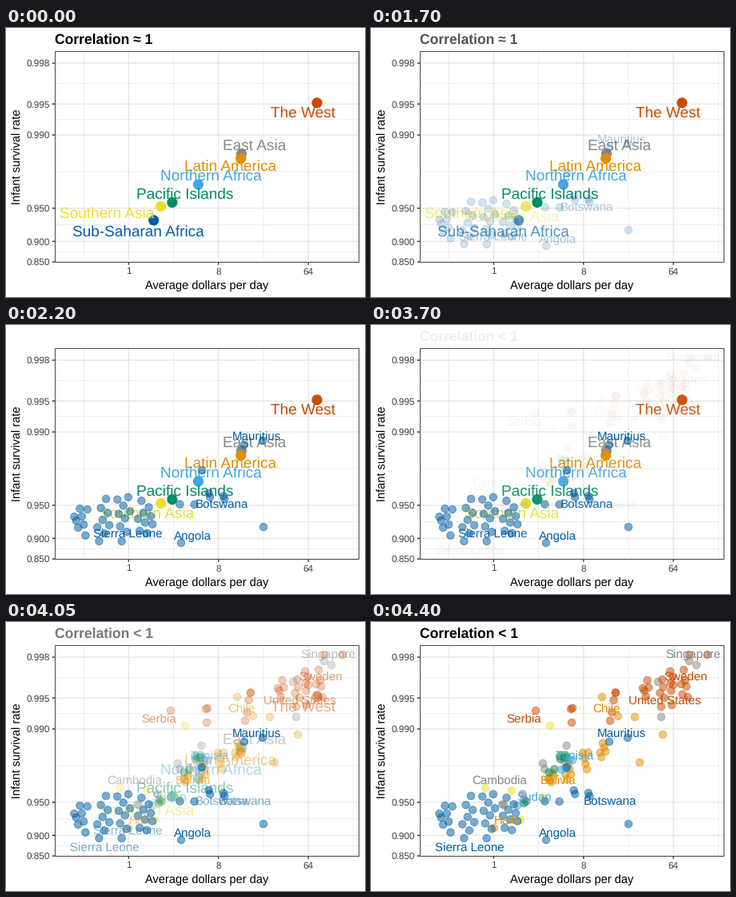
Recreate the animation shown at these times as a matplotlib script. Size 449x337 px, loop 7.4 s.

```python
import math

import matplotlib.pyplot as plt
import numpy as np
from matplotlib.animation import FuncAnimation
from matplotlib.collections import PatchCollection
from matplotlib.patches import Circle, Rectangle

W, H, DPI = 449, 337, 96
PT = 72 / DPI                      # points per pixel
LEFT, TOP, RIGHT, BOTTOM = 61.5, 29.5, 441.5, 293.5
STEP_MS, LOOP_MS, FADE_STEPS = 50, 7400, 15
FADE_STARTS = (1500, 3700)

WEST, BLUE, GREEN, ORANGE = "#CC4B00", "#005FA4", "#008D60", "#E18F00"
SKY, YELLOW, GREY = "#43A6E4", "#EDDE30", "#888888"
GRID, FRAME, TICK = "#E8E8E8", "#333333", "#3F3F3F"

plt.rcParams["font.family"] = "Liberation Sans"
plt.rcParams["text.hinting"] = "none"

fig = plt.figure(figsize=(W / DPI, H / DPI), dpi=DPI, facecolor="white")
ax = fig.add_axes([0, 0, 1, 1])
ax.set_xlim(0, W)
ax.set_ylim(H, 0)
ax.axis("off")

fading = []                        # (artist, base alpha, scenes it belongs to)


def x_pos(dollars):
    return 153.4 + 112.4 * math.log(dollars, 8)


def y_pos(rate):
    return 225.8 - 55.6 * (math.log(rate / (1 - rate)) - math.log(19))


def line(x0, y0, x1, y1, color, width):
    ax.plot([x0, x1], [y0, y1], color=color, lw=width * PT, zorder=1,
            solid_capstyle="butt", snap=False)


def write(x, base, text, px, color="black", ha="center", z=5, **kw):
    return ax.text(x, base, text, fontsize=px * PT, color=color, ha=ha,
                   va="baseline", zorder=z, **kw)


def label(x, mid, text, px, color, scenes, z):
    art = write(x, mid + 0.32 * px, text, px, color, z=z)
    fading.append((art, 1, scenes))


def dots(points, size, color, edge, alpha, scenes, z):
    art = PatchCollection([Circle(p, size / 2) for p in points], facecolor=color,
                          edgecolor=color, linewidth=edge * PT, zorder=z)
    ax.add_collection(art)
    fading.append((art, alpha, scenes))


def region(x, y, color, text, tx, ty, scenes=(0, 1)):
    dots([(x, y)], 13.2, color, 0, 1, scenes, 2)
    label(tx, ty, text, 18.97, color, scenes, 3)


def cloud(n, start, end, spread, focus=1.0):
    """Evenly scattered points in an ellipse along a segment, denser in the
    middle for focus > 1."""
    k = np.arange(1, n + 1)
    along = 2 * (k * 0.75488 % 1) - 1
    across = 2 * (k * 0.56984 % 1) - 1
    along = np.sign(along) * np.abs(along) ** focus
    across = np.sign(across) * np.abs(across) ** focus
    t = (along + 1) / 2
    x = start[0] + t * (end[0] - start[0])
    y = start[1] + t * (end[1] - start[1])
    return list(zip(x, y + spread * across * np.sqrt(1 - along ** 2)))


def countries(color, points, scenes=(2,)):
    dots(points, 9.5, color, 0.94, 0.52, scenes, 4)


def country(text, x, y, color, scenes=(2,)):
    label(x, y, text, 15.17, color, scenes, 5)


def draw_axes():
    rates = (0.998, 0.995, 0.99, 0.95, 0.9, 0.85)
    ys = [y_pos(r) for r in rates]
    for a, b in zip(ys, ys[1:]):
        line(LEFT, (a + b) / 2, RIGHT, (a + b) / 2, GRID, 0.75)
    for k in range(4):
        x = x_pos(8 ** (k - 0.5))
        line(x, TOP, x, BOTTOM, GRID, 0.75)
    for rate, y in zip(rates, ys):
        line(LEFT, y, RIGHT, y, GRID, 1.42)
        line(LEFT - 3.7, y, LEFT, y, FRAME, 1.42)
        write(LEFT - 7, y + 4.2, f"{rate:.3f}", 11.73, TICK, "right")
    for d in (1, 8, 64):
        x = x_pos(d)
        line(x, TOP, x, BOTTOM, GRID, 1.42)
        line(x, BOTTOM, x, BOTTOM + 3.2, FRAME, 1.42)
        write(x, 308.4, str(d), 11.73, TICK)
    ax.add_patch(Rectangle((LEFT, TOP), RIGHT - LEFT, BOTTOM - TOP, fill=False,
                           ec="#484848", lw=PT, zorder=6, snap=False))
    write((LEFT + RIGHT) / 2, 327, "Average dollars per day", 14.67)
    ax.text(22, (TOP + BOTTOM) / 2, "Infant survival rate", fontsize=14.67 * PT,
            ha="right", va="center", rotation=90)


def draw_title(text, scenes):
    art = write(LEFT - 0.5, 20, text, 17.5, ha="left", weight="bold")
    fading.append((art, 1, scenes))


draw_axes()
draw_title("Correlation ≈ 1", (0,))
draw_title("Correlation < 1", (2,))

# Regional averages
region(388.5, 93.3, WEST, "The West", 371.8, 106)
region(294, 157, GREY, "East Asia", 310.7, 147)
region(293.2, 163, ORANGE, "Latin America", 280.5, 173)
region(240, 195.5, SKY, "Northern Africa", 256.5, 185)
region(207.4, 218, GREEN, "Pacific Islands", 223.5, 208)
region(193.2, 223, YELLOW, "Southern Asia", 125.7, 232, (0,))
region(193.2, 223, YELLOW, "Southern Asia", 176.5, 236, (1,))
region(184.2, 240.4, BLUE, "Sub-Saharan Africa", 165.7, 255, (0,))

# Single countries: a cloud along each region's trend plus its outliers
countries(GREY, cloud(9, (162, 232), (266, 147), 16)
          + [(359, 75), (363, 119), (398, 49), (407, 54)])
countries(YELLOW, [(224, 130), (143, 208), (176, 211), (187, 248), (216, 221)])
countries(ORANGE, cloud(20, (220, 199), (308, 150), 14)
          + [(289, 94), (309, 118), (330, 119), (365, 141), (336, 176), (154, 258)])
countries(GREEN, cloud(6, (222, 190), (250, 158), 8) + [(191, 227), (194, 225)])
countries(SKY, cloud(4, (238, 186), (257, 168), 6) + [(183, 230)])
countries(WEST, cloud(22, (338, 86), (410, 72), 27, 1.4)
          + cloud(5, (299, 125), (308, 76), 3)
          + [(206, 111), (250, 109), (252, 108), (251, 126), (398, 41), (421, 41)])
countries(BLUE, cloud(34, (83, 244), (194, 238), 32, 1.1)
          + cloud(6, (216, 226), (290, 209), 9)
          + [(245, 182), (298, 150), (321, 145), (322, 253), (219, 273)], (1, 2))

country("Mauritius", 313, 140.5, BLUE, (1, 2))
country("Angola", 234, 264.5, BLUE, (1, 2))
country("Sierra Leone", 152.5, 262.5, BLUE, (1,))
country("Botswana", 269.5, 224.5, BLUE, (1,))
country("Sierra Leone", 123, 283.5, BLUE)
country("Botswana", 299, 224.5, BLUE)
country("Singapore", 402.5, 40.5, GREY)
country("Cambodia", 161, 199.5, GREY)
country("Sweden", 393.5, 69, WEST)
country("United States", 367.5, 99.5, WEST)
country("Serbia", 191, 122.5, WEST)
country("Chile", 294, 109.5, ORANGE)
country("Bolivia", 234.5, 199.5, ORANGE)
country("Haiti", 168.5, 249.5, ORANGE)
country("Tunisia", 254.5, 168.5, SKY)
country("Sudan", 204, 220.5, SKY)


def update(i):
    # Linear cross-fade: the first fading picture already shows one step
    first, second = (np.clip(i + 1 - t / STEP_MS, 0, FADE_STEPS) / FADE_STEPS
                     for t in FADE_STARTS)
    weight = (1 - first, first - second, second)
    for art, base, scenes in fading:
        share = min(1, sum(weight[s] for s in scenes))
        art.set_alpha(base * share)
        art.set_visible(share > 0)
    return [art for art, _, _ in fading]


anim = FuncAnimation(fig, update, frames=LOOP_MS // STEP_MS, interval=STEP_MS,
                     repeat=True, repeat_delay=0, blit=False)
plt.show()
```
